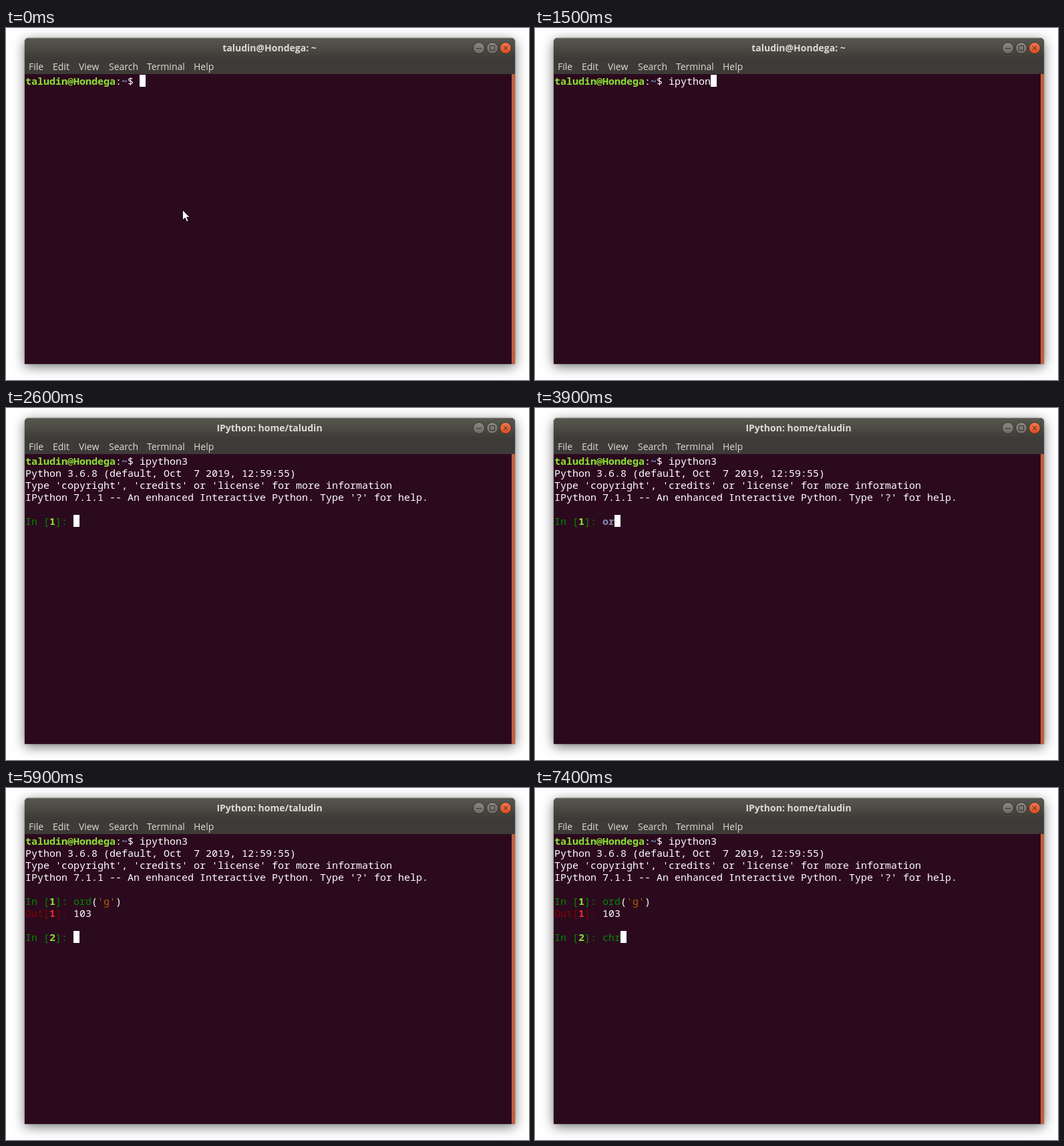
Write an HTML page that moves like this. It is 783 by 527 pixels and loops after 8000 ms.

```html
<!DOCTYPE html>
<html lang="en">
<head>
<meta charset="utf-8">
<title>Terminal</title>
<style>
  html, body { margin: 0; width: 100%; height: 100%; overflow: hidden; background: #fff; }
  #window {
    position: absolute; left: 28px; top: 15px; width: 734px; height: 488px;
    border-radius: 6px 6px 0 0; background: #2c0a1e;
    box-shadow: 0 4px 18px rgba(0, 0, 0, .55), 0 0 2px rgba(0, 0, 0, .5);
  }
  svg { position: absolute; left: 0; top: 0; }
  svg text { font: 14px "Open Sans", "Noto Sans", sans-serif; fill: #dfdbd2; }
  #title { font-weight: 700; text-anchor: middle; }
  pre {
    position: absolute; left: 29px; top: 70px; margin: 0;
    font: 15px/18px "Noto Sans Mono", "DejaVu Sans Mono", monospace; color: #fff;
  }
  pre b, pre i { font-style: normal; }
  .user { color: #8ae234; }
  .path { color: #729fcf; }
  .in { color: #008700; }
  .out { color: #870000; }
  .err { color: #ef2929; }
  .str { color: #af5f00; }
  .word { color: #8787af; }
  .match, .caret { display: inline-block; width: 9px; height: 18px; vertical-align: top; }
  .match { color: #000; background: #afd7d7; }
  .caret { background: #fff; }
</style>
</head>
<body>
<div id="window"></div>
<svg width="783" height="527">
  <defs>
    <linearGradient id="bar" x2="0" y2="1">
      <stop stop-color="#59584f"/><stop offset="1" stop-color="#3c3b37"/>
    </linearGradient>
    <linearGradient id="grey" x2="0" y2="1">
      <stop stop-color="#8a8880"/><stop offset="1" stop-color="#6b6962"/>
    </linearGradient>
    <linearGradient id="red" x2="0" y2="1">
      <stop stop-color="#f27a52"/><stop offset="1" stop-color="#dc4a1c"/>
    </linearGradient>
  </defs>
  <path d="M28 46V21q0-6 6-6H756q6 0 6 6V46z" fill="url(#bar)"/>
  <path d="M33 15.5H757" stroke="#6b6a60"/>
  <path d="M28 45H762V69H28z" fill="#3c3b37"/>
  <path d="M757 69H762V503H757z" fill="#c45c3e"/>
  <g stroke="#32312c">
    <circle cx="708" cy="30" r="8.5" fill="url(#grey)"/>
    <circle cx="728" cy="30" r="8.5" fill="url(#grey)"/>
    <circle cx="748" cy="30" r="8.5" fill="url(#red)"/>
    <path d="M704 30.5h8M724.5 26.5h7v7h-7zM745 27l6 6m0-6l-6 6" fill="none"/>
  </g>
  <text id="title" x="394.5" y="35"></text>
  <g id="menu"></g>
  <path id="arrow" d="M264.5 272.5V287.5L268 284.3L270.6 290L273 289L270.5 283.3H275z" fill="#fff" stroke="#000" stroke-width=".8"/>
  <path id="beam" d="M262 265.5h3l.5.5l.5-.5h3M265.5 266V281M262 281.5h3l.5-.5l.5.5h3" fill="none" stroke="#fff"/>
</svg>
<pre id="screen"></pre>
<script>
const LOOP = 8000;
const USER = 'taludin', HOST = 'Hondega';
const $ = id => document.getElementById(id);
const paint = (cls, text, tag = 'i') => `<${tag} class="${cls}">${text}</${tag}>`;
const between = (t, from, to) => t >= from && t < to;

// One key time per character
const typed = (t, text, times) => text.slice(0, times.filter(k => k <= t).length);
const SHELL_KEYS = [500, 800, 1000, 1200, 1300, 1300, 1500, 2000];
const ORD_KEYS = [3700, 3900, 4200, 4400, 4800, 4800, 5000, 5400];
const CHR_KEYS = [7200, 7300, 7400];
const CARET_OFF = [[200, 500], [3200, 3700], [6300, 6900]];

const BANNER = `Python 3.6.8 (default, Oct  7 2019, 12:59:55)
Type 'copyright', 'credits' or 'license' for more information
IPython 7.1.1 -- An enhanced Interactive Python. Type '?' for help.

`;

const shellPrompt = paint('user', `${USER}@${HOST}`, 'b') + ':' + paint('path', '~', 'b') + '$ ';
const prompt = n => paint('in', 'In [') + paint('user', n, 'b') + paint('in', ']: ');
const result = (n, value) =>
  paint('out', 'Out[') + paint('err', n, 'b') + paint('out', ']: ') + value;

function highlight(code, matching) {
  if (code === 'or') return paint('word', code, 'b');
  return code
    .replace(/'.*?('|$)/, s => paint('str', s))
    .replace(/^(ord|chr)/, s => paint('in', s))
    .replace(/[()]/g, s => matching ? paint('match', s) : s);
}

function screenAt(t) {
  let text = shellPrompt + typed(t, 'ipython3', SHELL_KEYS);
  if (t >= 2500) text += '\n';
  if (t >= 2600) {
    text += BANNER + prompt(1) +
      highlight(typed(t, "ord('g')", ORD_KEYS), between(t, 5400, 5900));
  }
  if (t >= 5900) {
    text += '\n' + result(1, 103) + '\n\n' + prompt(2) + highlight(typed(t, 'chr', CHR_KEYS));
  }
  const hidden = CARET_OFF.some(([from, to]) => between(t, from, to));
  return hidden ? text : text + paint('caret', '');
}

const MENU = { File: 34, Edit: 70, View: 109, Search: 154, Terminal: 211, Help: 281 };
$('menu').innerHTML = Object.entries(MENU)
  .map(([name, x]) => `<text x="${x}" y="63">${name}</text>`).join('');

let shown;
function draw(now) {
  const t = now % LOOP;
  const html = screenAt(t);
  if (html !== shown) $('screen').innerHTML = shown = html;
  $('title').textContent = t < 2600 ? `${USER}@${HOST}: ~` : `IPython: home/${USER}`;
  $('arrow').style.display = t < 200 ? '' : 'none';
  $('beam').style.display = between(t, 200, 400) ? '' : 'none';
}

const start = performance.now();
function tick() {
  draw(performance.now() - start);
  requestAnimationFrame(tick);
}
tick();
</script>
</body>
</html>
```
